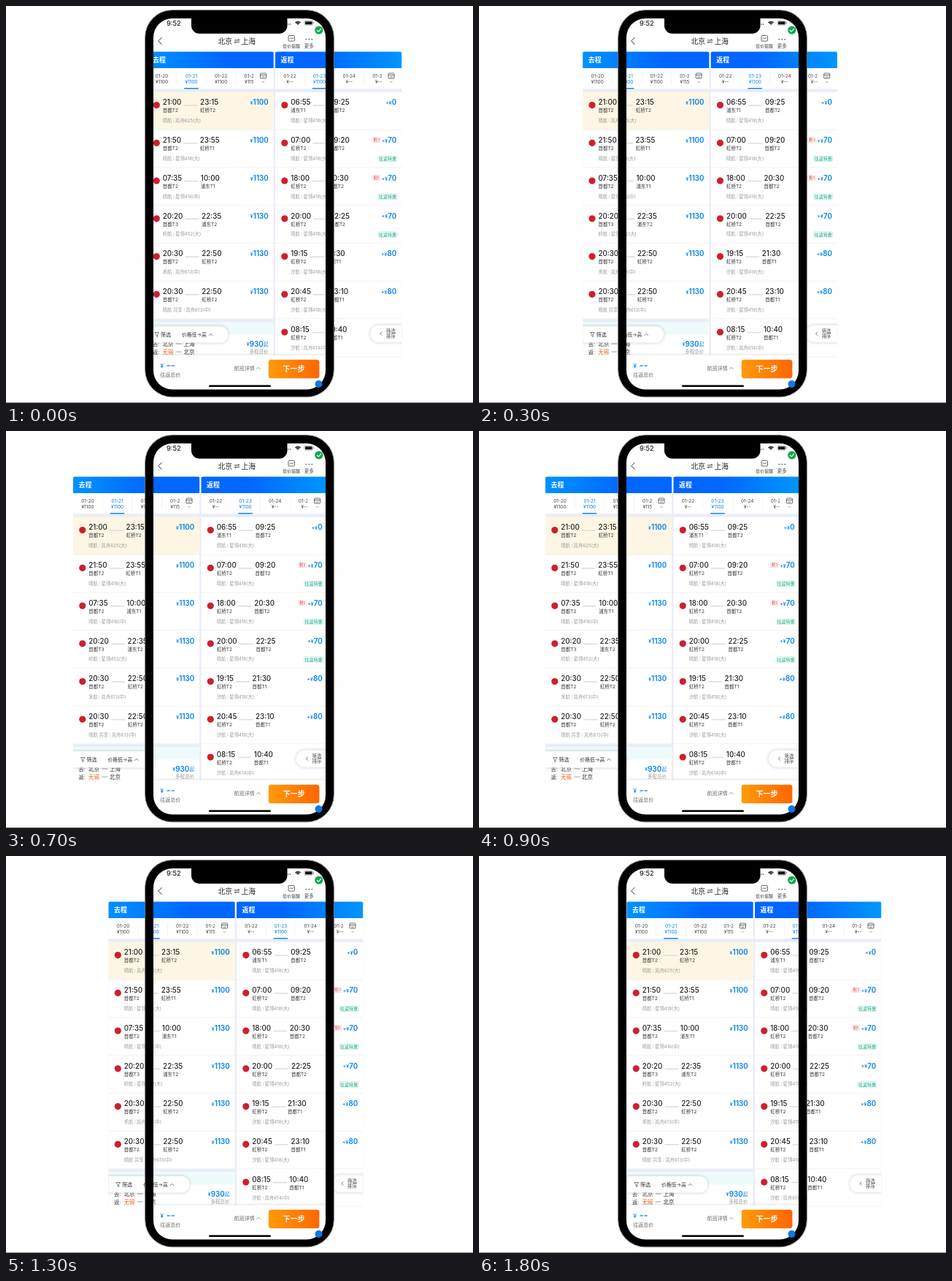
Write an HTML page with a canvas that moves like this. It is 640 px wide and 543 px high and loops after 1.9 s.

```html
<!DOCTYPE html>
<html lang="zh-CN">
<head>
<meta charset="utf-8">
<title>往返航班</title>
<style>
html, body { margin: 0; width: 100%; height: 100%; overflow: hidden; background: #fff; }
canvas { display: block; width: 640px; height: 543px; }
</style>
</head>
<body>
<canvas id="stage"></canvas>
<script>
const W = 640, H = 543, LOOP = 1900, STEP = 100;
const canvas = document.getElementById('stage');
const ratio = window.devicePixelRatio || 1;
canvas.width = W * ratio;
canvas.height = H * ratio;
const ctx = canvas.getContext('2d');
ctx.scale(ratio, ratio);

const FONT = 'Inter, "Noto Sans CJK SC", "Noto Sans CJK", sans-serif';
const BLUE = '#0082f0', INK = '#222', GREY = '#999', RED = '#cf1f2d', BAND = '#e9ecf8';
const PANEL = 173.2, BACK = 175.5, STRIP = BACK + PANEL;

// [step, left edge of the strip]
const PATH = [[0, 193.5], [5, 108], [6, 98.5], [7, 92], [8, 90], [9, 91], [10, 98],
  [11, 108], [12, 124.5], [13, 140.5], [16, 193], [17, 200], [18, 202.5]];

// departure, airport, arrival, airport, carrier, aircraft, price, seats left, special fare
const OUTBOUND = [
  ['21:00', '首都T2', '23:15', '虹桥T2', '晴航', '岚舟625(大)', '1100'],
  ['21:50', '首都T2', '23:55', '虹桥T1', '晴航', '星翎418(大)', '1100'],
  ['07:35', '首都T2', '10:00', '浦东T1', '晴航', '星翎416(中)', '1130'],
  ['20:20', '首都T3', '22:35', '浦东T2', '岭航', '星翎452(大)', '1130'],
  ['20:30', '首都T2', '22:50', '虹桥T2', '禾航', '岚舟613(中)', '1130'],
  ['20:30', '首都T2', '22:50', '虹桥T2', '晴航 共享', '岚舟613(中)', '1130']
];
const INBOUND = [
  ['06:55', '浦东T1', '09:25', '首都T2', '晴航', '星翎418(大)', '0'],
  ['07:00', '虹桥T2', '09:20', '首都T2', '晴航', '星翎418(大)', '70', '剩3', true],
  ['18:00', '虹桥T2', '20:30', '首都T2', '晴航', '星翎418(大)', '70', '剩5', true],
  ['20:00', '虹桥T2', '22:25', '首都T2', '晴航', '星翎418(大)', '70', '', true],
  ['19:15', '虹桥T2', '21:30', '首都T1', '汐航', '星翎418(大)', '80'],
  ['20:45', '虹桥T2', '23:10', '首都T1', '汐航', '星翎418(大)', '80'],
  ['08:15', '虹桥T2', '10:40', '首都T1', '汐航', '岚舟614(中)', '']
];

function stripLeft(step) {
  const i = Math.max(1, PATH.findIndex(p => p[0] >= step));
  const [s0, x0] = PATH[i - 1], [s1, x1] = PATH[i];
  return x0 + (x1 - x0) * (step - s0) / (s1 - s0);
}

// Draws text centred vertically on y and returns its width.
function text(str, x, y, size, color = INK, weight = 400, align = 'left') {
  ctx.font = `${weight} ${size}px ${FONT}`;
  ctx.textAlign = align;
  ctx.fillStyle = color;
  ctx.fillText(str, x, y + size * 0.365);
  return ctx.measureText(str).width;
}

function rect(x, y, w, h, color) {
  ctx.fillStyle = color;
  ctx.fillRect(x, y, w, h);
}

function box(x, y, w, h, radius, color) {
  ctx.beginPath();
  ctx.roundRect(x, y, w, h, radius);
  ctx.fillStyle = color;
  ctx.fill();
}

function circle(x, y, r, color) {
  ctx.beginPath();
  ctx.arc(x, y, r, 0, Math.PI * 2);
  ctx.fillStyle = color;
  ctx.fill();
}

function line(points, color = '#555', width = 0.8) {
  ctx.beginPath();
  points.forEach(([x, y]) => ctx.lineTo(x, y));
  ctx.strokeStyle = color;
  ctx.lineWidth = width;
  ctx.stroke();
}

function frame(x, y, w, h, color, radius = 0.5, width = 0.5) {
  ctx.beginPath();
  ctx.roundRect(x, y, w, h, radius);
  ctx.strokeStyle = color;
  ctx.lineWidth = width;
  ctx.stroke();
}

// Horizontal gradient; x1 may lie left of x0, and the last colour holds beyond it.
function across(x0, x1, from, to) {
  const g = ctx.createLinearGradient(x0, 0, x1, 0);
  g.addColorStop(0, from);
  g.addColorStop(1, to);
  return g;
}

function clipped(x, y, w, h, draw) {
  ctx.save();
  ctx.beginPath();
  ctx.rect(x, y, w, h);
  ctx.clip();
  draw();
  ctx.restore();
}

function shadowed(draw) {
  ctx.save();
  ctx.shadowColor = 'rgba(0,0,0,.22)';
  ctx.shadowBlur = 4 * ratio;
  draw();
  ctx.restore();
}

function price(prefix, value, right, y) {
  const w = text(value, right, y, 9.8, BLUE, 600, 'right');
  return right - w - text(prefix, right - w - 0.4, y + 1, 6.6, BLUE, 600, 'right');
}

function dates(x, days, fares) {
  clipped(x, 85, 146, 30, () => days.forEach((day, i) => {
    const cx = x + 20 + i * 40.6, color = i === 1 ? BLUE : '#444';
    text(day, cx, 95.3, 6.5, color, 400, 'center');
    text(fares[i], cx, 103.4, 6.5, color, 400, 'center');
    if (i) rect(cx - 20.5, 91, 0.5, 17, '#e6e6e6');
  }));
  rect(x + 50.7, 112, 19.5, 1.4, BLUE);
  frame(x + 155, 92, 8, 7, '#444', 1, 0.8);
  line([[x + 155, 94.4], [x + 163, 94.4]], '#444');
  line([[x + 157, 97], [x + 161, 97]], '#444', 0.7);
  line([[x + 157.3, 103], [x + 159, 104.5], [x + 160.7, 103]], '#777', 0.7);
}

function flight(x, y, row, prefix) {
  const [leave, from, arrive, to, carrier, craft, fare, seats, special] = row;
  const left = x + 21.2, mid = y + 14.2;
  circle(x + 12.8, y + 18, 4.6, RED);
  const start = left + text(leave, left, mid, 9.8, INK, 500) + 3.2;
  rect(start, y + 17.6, 19, 1.6, '#dedede');
  const second = start + 22.5;
  text(arrive, second, mid, 9.8, INK, 500);
  text(from, left, y + 25.3, 6.5, '#333');
  text(to, second, y + 25.3, 6.5, '#333');
  const bar = left + text(carrier, left, y + 39.2, 6.3, GREY) + 2.2;
  rect(bar, y + 36.6, 0.6, 5.2, '#ccc');
  text(craft, bar + 2.6, y + 39.2, 6.3, GREY);
  const right = x + 166.3;
  if (fare) {
    const edge = price(prefix, fare, right, mid);
    if (seats) {
      frame(edge - 13, y + 10.7, 11, 6.5, '#f5b5b8');
      text(seats, edge - 7.5, y + 14, 5.4, '#e5454c', 400, 'center');
    }
  }
  if (special) {
    frame(right - 25, y + 36, 25.5, 7, '#8fd9c4');
    text('往返特惠', right - 12.3, y + 39.5, 6, '#00a37c', 400, 'center');
  }
}

function panel(x, title, fill, rows, prefix) {
  rect(x, 85, PANEL, 393, '#fff');
  box(x, 62.6, PANEL, 22.4, [2, 2, 0, 0], fill);
  text(title, x + 7.5, 73.8, 9, '#fff', 600);
  rect(x, 113.4, PANEL, 4.3, BAND);
  rows.forEach((row, i) => {
    const y = 117.6 + i * 51.75;
    if (prefix === '¥' && i === 0) rect(x, y, PANEL, 51.7, '#fdf6e4');
    rect(x, y + 51.2, PANEL, 0.6, '#e9e9e9');
    flight(x, y, row, prefix);
  });
}

function tripLine(x, y, label, city, color, end) {
  text(label, x + 7.5, y, 7.3, '#333');
  text(city, x + 21, y, 7.5, color);
  line([[x + 39.5, y], [x + 47, y]], '#777', 0.7);
  text(end, x + 50, y, 7.5, '#333');
}

function strip(x) {
  const back = x + BACK, end = x + STRIP;
  rect(x, 85, STRIP, 393, BAND);
  panel(x, '去程', across(x, x + 110, '#0092ff', '#0066ff'), OUTBOUND, '¥');
  dates(x, ['01-20', '01-21', '01-22', '01-23'], ['¥1100', '¥1100', '¥1100', '¥1150']);
  rect(x, 428.2, PANEL, 4.3, BAND);
  rect(x, 432.5, PANEL, 17, '#effbfb');
  tripLine(x, 462, '去:', '北京', '#333', '上海');
  tripLine(x, 473, '返:', '无锡', '#ff5a14', '北京');
  text('起', x + 166, 462.5, 6.5, BLUE, 400, 'right');
  price('¥', '930', x + 159.3, 462);
  text('多程总价', x + 166, 472.2, 6.5, GREY, 400, 'right');

  panel(back, '返程', across(end, end - 110, '#0096ff', '#0066ff'), INBOUND, '+¥');
  dates(back, ['01-22', '01-23', '01-24', '01-25'], ['¥--', '¥1100', '¥--', '¥--']);

  clipped(x, 430, STRIP, 48, () => {
    shadowed(() => box(x - 12, 438, 123, 22.5, 11.2, '#fff'));
    shadowed(() => box(x + 305.7, 436.5, 60, 23.5, 11.7, '#fff'));
  });
  line([[x + 10.5, 446.5], [x + 16, 446.5], [x + 14.1, 449.4], [x + 14.1, 452.5],
    [x + 12.4, 451.5], [x + 12.4, 449.4], [x + 10.5, 446.5]], '#444', 0.7);
  text('筛选', x + 18.5, 449.5, 7, '#333');
  text('价格低→高', x + 47.5, 449.5, 6.8, '#333');
  line([[x + 84.5, 450.8], [x + 87, 448.2], [x + 89.5, 450.8]]);
  line([[x + 321.7, 445.7], [x + 319.4, 448.2], [x + 321.7, 450.7]]);
  text('筛选', x + 327.5, 445, 6.4, '#444');
  text('排序', x + 327.5, 451.7, 6.4, '#444');
}

function statusAndTitle() {
  text('9:52', 220, 23.5, 9.2, INK, 500);
  [387, 389.5].forEach(x => circle(x, 25, 0.7, INK));
  [4.6, 2.8, 1].forEach(r => {
    ctx.beginPath();
    ctx.arc(400, 26, r, -Math.PI * 0.77, -Math.PI * 0.23);
    ctx.strokeStyle = '#111';
    ctx.lineWidth = 1.3;
    ctx.stroke();
  });
  frame(409, 20.2, 11.5, 6, '#777', 1.5, 0.6);
  box(410, 21.2, 9.5, 4, 0.7, '#111');
  rect(421.3, 22.2, 0.8, 2, '#777');

  line([[213.5, 43], [208.8, 47.8], [213.5, 52.6]], '#333', 1);
  text('北京', 290.5, 48, 9.8, '#222', 500);
  text('上海', 322.5, 48, 9.8, '#222', 500);
  line([[313, 46.8], [320, 46.8], [318.2, 45.2]], '#333', 0.9);
  line([[320, 49.3], [313, 49.3], [314.8, 50.9]], '#333', 0.9);
  frame(387, 40.5, 8.5, 7.5, '#444', 1, 0.8);
  line([[388.5, 45.3], [390.3, 43.4], [392, 45], [394.2, 42.8]], '#444', 0.8);
  text('低价提醒', 391, 54.8, 6, '#444', 400, 'center');
  [411.3, 415.3, 419.3].forEach(x => circle(x, 45.5, 0.8, '#333'));
  text('更多', 415.3, 54.8, 6.5, '#444', 400, 'center');
}

function checkout() {
  shadowed(() => rect(201, 477.5, 238, 49, '#fff'));
  text('¥', 211.5, 492, 8, BLUE, 500);
  line([[220.5, 492], [224.8, 492]], BLUE, 1.3);
  line([[226.5, 492], [230.8, 492]], BLUE, 1.3);
  text('往返总价', 211.3, 504.8, 7, '#666');
  text('航班详情', 312.8, 495.6, 7, '#666');
  line([[343.5, 496.8], [346, 494.3], [348.5, 496.8]], '#777');
  box(359.8, 483.8, 69.6, 25.4, 3.5, across(359.8, 429.4, '#ff9a0a', '#ff6600'));
  text('下一步', 394.5, 496.4, 10, '#fff', 600, 'center');
  box(278, 518.4, 85, 2.6, 1.3, '#000');
}

function phone() {
  ctx.beginPath();
  ctx.roundRect(190.8, 5.8, 258.4, 528.8, 37);
  ctx.roundRect(202, 17, 236, 507.5, 26);
  ctx.fillStyle = '#000';
  ctx.fill('evenodd');
  frame(190.6, 5.6, 258.8, 529.2, '#777', 37.2, 0.9);
  box(254, 14, 131.5, 23.8, [0, 0, 11, 11], '#000');
  circle(428.8, 33, 5.6, '#0aa84f');
  line([[426, 33], [428.2, 35.2], [432, 30.8]], '#fff', 1.2);
  circle(428.5, 517, 5, '#0a7be8');
}

function draw(time) {
  const step = Math.floor((time % LOOP) / STEP + 1e-6);
  rect(0, 0, W, H, '#fff');
  strip(stripLeft(step));
  clipped(196, 10, 248, 52, statusAndTitle);
  clipped(196, 470, 248, 56, checkout);
  phone();
  rect(0, 542, W, 1, '#8a8a8a');
}

const began = performance.now();
function tick() {
  draw(performance.now() - began);
  requestAnimationFrame(tick);
}
tick();
</script>
</body>
</html>
```
